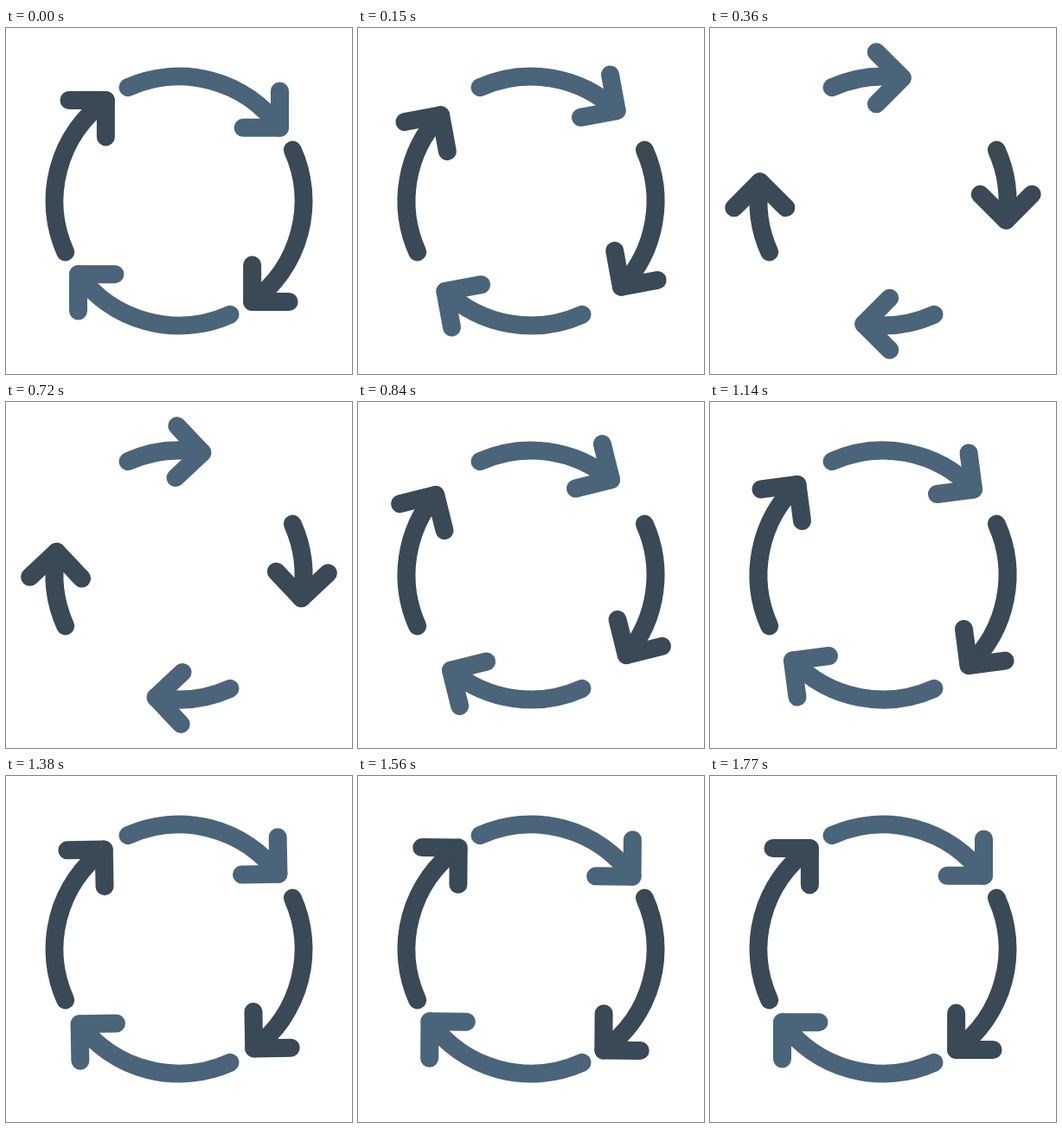
Write an HTML page with a canvas that moves like this. It is 400x400 px and loops after 2830 ms.

```html
<!DOCTYPE html>
<html lang="en">
<head>
<meta charset="utf-8">
<title>Circling arrows</title>
<style>
  html, body { margin: 0; width: 100%; height: 100%; overflow: hidden; background: #fff; }
  canvas { display: block; width: 100vmin; height: 100vmin; }
</style>
</head>
<body>
<canvas id="stage"></canvas>
<script>
const SIZE = 400;
const LOOP = 2830;
const STEP = 30;
const LAST_STEP = 59;
const RADIUS = 144;
const STROKE = 21;
const ARM = 30;
const DEG = Math.PI / 180;

// Angles run clockwise from the top of the ring.
const TAIL = -24.2;
const REST = 54;
const HEAD_TILT = -9;
const COLORS = ['#4a6479', '#394956'];

// [step, swing of the head away from its rest angle]
const KEYS = [[0, 0], [18.8, -63.5], [33, 4.9], [38.5, -7.7], [49, 0.5], [59, 0]];

const canvas = document.getElementById('stage');
const ctx = canvas.getContext('2d');

function resize() {
  const side = Math.min(innerWidth, innerHeight) || SIZE;
  canvas.width = canvas.height = Math.round(side * (window.devicePixelRatio || 1));
}

const ease = p => (1 - Math.cos(Math.PI * p)) / 2;

function swingAt(step) {
  const i = KEYS.findIndex(key => step <= key[0]);
  if (i <= 0) return 0;
  const [s0, v0] = KEYS[i - 1];
  const [s1, v1] = KEYS[i];
  return v0 + (v1 - v0) * ease((step - s0) / (s1 - s0));
}

function drawArrow(turn, tip, color) {
  ctx.save();
  ctx.strokeStyle = color;
  ctx.rotate(turn * 90 * DEG);

  ctx.beginPath();
  ctx.arc(0, 0, RADIUS, (TAIL - 90) * DEG, (tip - 90) * DEG);
  ctx.stroke();

  ctx.rotate(tip * DEG);
  ctx.translate(0, -RADIUS);
  ctx.rotate(HEAD_TILT * DEG);
  ctx.beginPath();
  ctx.moveTo(-ARM, -ARM);
  ctx.lineTo(0, 0);
  ctx.lineTo(-ARM, ARM);
  ctx.stroke();
  ctx.restore();
}

function draw(time) {
  const step = Math.min(Math.floor(time / STEP), LAST_STEP);
  const tip = REST + swingAt(step);
  const scale = canvas.width / SIZE;

  ctx.setTransform(scale, 0, 0, scale, 0, 0);
  ctx.fillStyle = '#fff';
  ctx.fillRect(0, 0, SIZE, SIZE);
  ctx.translate(SIZE / 2, SIZE / 2);
  ctx.lineWidth = STROKE;
  ctx.lineCap = ctx.lineJoin = 'round';
  for (let i = 0; i < 4; i++) drawArrow(i, tip, COLORS[i % 2]);
}

const start = performance.now();

function tick() {
  draw((performance.now() - start) % LOOP);
  requestAnimationFrame(tick);
}

addEventListener('resize', resize);
resize();
tick();
</script>
</body>
</html>
```
